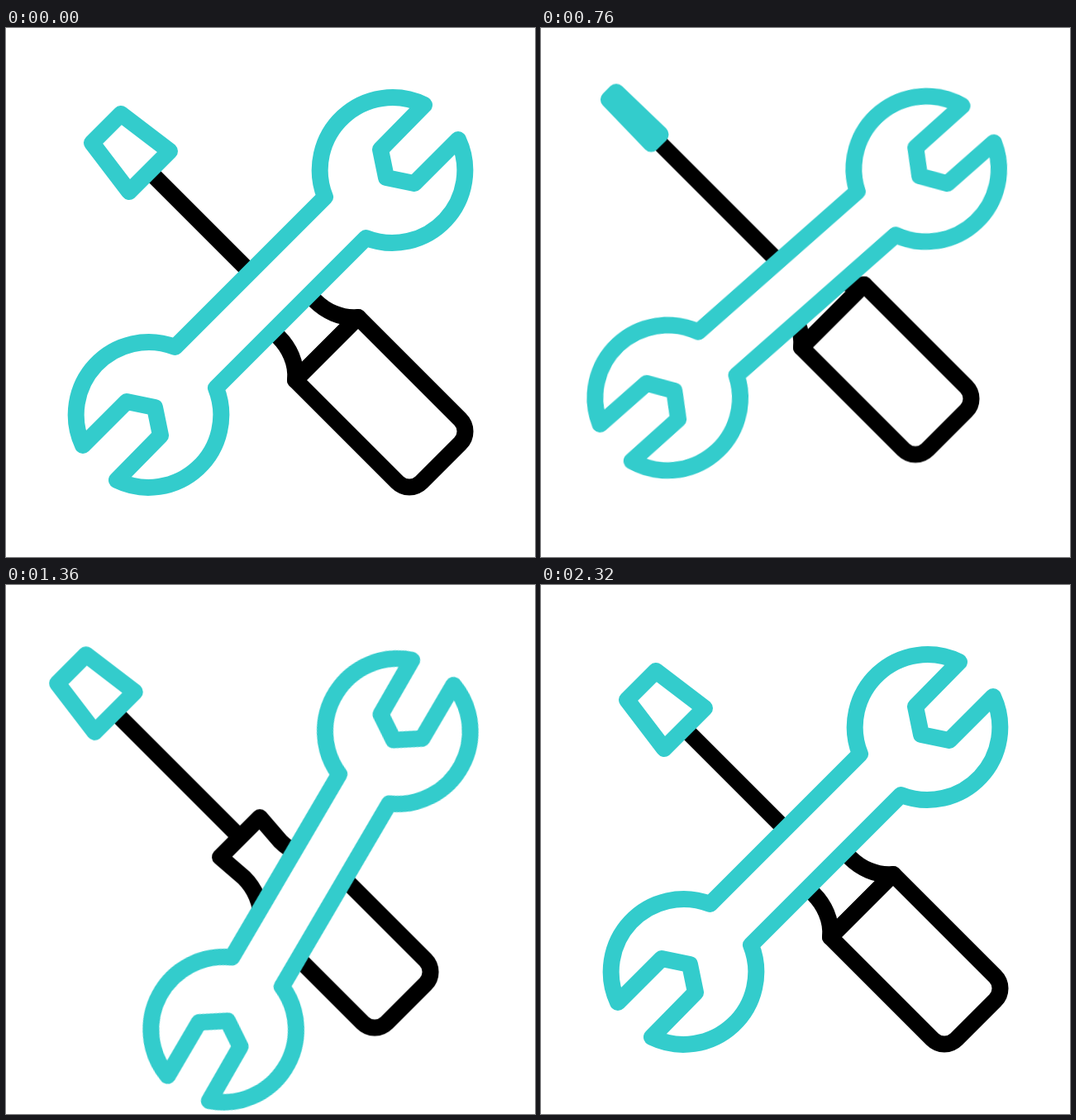
Write an HTML page without scripts that moves like this. It is 640 by 640 pixels and loops after 2400 ms.

```html
<!DOCTYPE html>
<html lang="en">
<head>
<meta charset="utf-8">
<title>Wrench and screwdriver</title>
<style>
  html, body { margin: 0; width: 100%; height: 100%; overflow: hidden; background: #fff; }
  svg { display: block; width: 100%; height: 100%; }
  path { fill: #fff; stroke: #000; stroke-width: 20; stroke-linejoin: round; }
  .teal { stroke: #33cccc; }

  .wrench, .driver, .blade { animation: 2400ms infinite; }
  .wrench {
    transform-origin: 490px 150px;
    animation-name: swing;
    animation-timing-function: cubic-bezier(.333, 0, .667, 1);
  }
  .driver { animation-name: drift; animation-timing-function: linear; }
  .blade { animation-name: spin; animation-timing-function: cubic-bezier(.333, 0, .667, 1); }

  @keyframes swing {
    0%, 90.9%, 100% { transform: rotate(0deg); }
    21.67%, 55.5% { transform: rotate(-15deg); }
    38.96% { transform: rotate(15deg); }
    72.8% { transform: rotate(10.9deg); }
  }

  @keyframes drift {
    0%, 96.67%, 100% { transform: translate(0, 0); }
    9.72% { transform: translate(-11px, -14px); }
    19.44% { transform: translate(-23px, -29.5px); }
    23.33% { transform: translate(-28px, -35px); }
    31.67% { transform: translate(-35px, -39.5px); }
    40.83% { transform: translate(-38.5px, -39.8px); }
    47.5% { transform: translate(-40.7px, -34px); }
    56.25% { transform: translate(-42px, -20.5px); }
    65% { transform: translate(-41px, -7.7px); }
    70.83% { transform: translate(-34.5px, -.5px); }
    78.33% { transform: translate(-22.8px, 2.7px); }
    87.5% { transform: translate(-10.5px, 2px); }
  }

  /* the blade turns on its axis: face-on, then edge-on */
  @keyframes spin {
    0%, 19.58%, 38.96%, 57.29%, 77.92%, 96.67%, 100% {
      d: path("M139 104 L104 139 L149 198 L198 149 Z");
    }
    9.72%, 29.38%, 48.2%, 65.6%, 87.5% {
      d: path("M123.8 119.2 L119.2 123.8 L171.7 176.3 L176.3 171.7 Z");
    }
  }
</style>
</head>
<body>
<svg viewBox="0 0 640 640">
  <g class="driver">
    <path d="M173 173 L325 325"/>
    <path d="M349 301 L374 330 C386 342 405 352 426 350 L350 426 C352 405 342 386 330 374 L301 349 Z"/>
    <path d="M426 350 L549.5 473.5 A20.5 20.5 0 0 1 549.5 502.5 L502.5 549.5 A20.5 20.5 0 0 1 473.5 549.5 L350 426 Z"/>
    <path class="blade teal" d="M139 104 L104 139 L149 198 L198 149 Z"/>
  </g>
  <path class="wrench teal" d="M386 204.5 A87.8 87.8 0 0 1 506 93 L453 147 L460 181 L494 188 L547 135
    A87.8 87.8 0 0 1 435.5 254 L254 435.5 A87.8 87.8 0 0 1 134 547 L187 493 L180 459 L146 452 L93 505
    A87.8 87.8 0 0 1 204.5 386 Z"/>
</svg>
</body>
</html>
```
